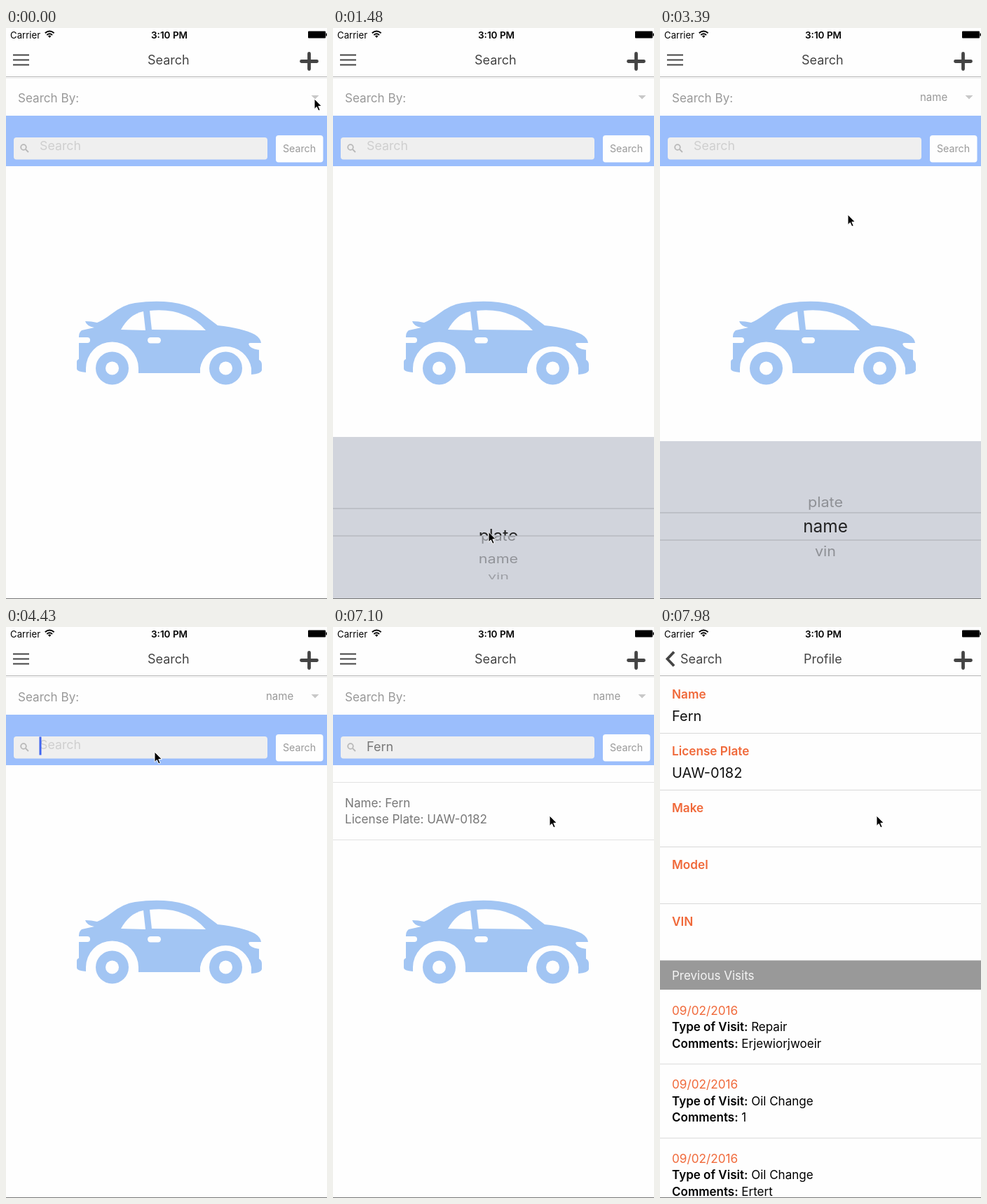
An HTML page that plays this animation: 458x814 px, repeating every 8000 ms.

```html
<!DOCTYPE html>
<html lang="en">
<head>
<meta charset="utf-8">
<title>Vehicle search</title>
<style>
  html, body { margin: 0; width: 100%; height: 100%; overflow: hidden; background: #fefefe; }
  svg { display: block; width: 458px; height: 814px; font-family: Inter, Roboto, sans-serif; }
  text { white-space: pre; }
</style>
</head>
<body>
<svg id="stage" viewBox="0 0 458 814">
  <defs>
    <clipPath id="lens"><rect y="685" width="458" height="39"/></clipPath>
    <clipPath id="rim"><path d="M0 583H458V685H0ZM0 724H458V840H0Z"/></clipPath>
  </defs>

  <g id="searchView">
    <rect y="70" width="458" height="744" fill="#fefefe"/>
    <text x="17" y="106" font-size="17.1" fill="#999">Search By:</text>
    <text id="choice" x="371" y="104" font-size="15" fill="#999">name</text>
    <path d="M435.500 96H446.500L441 101.500Z" fill="#c8c8c8"/>
    <rect y="125" width="458" height="72" fill="#9bbefc"/>
    <rect x="11" y="156" width="362" height="31.500" rx="4" fill="#efefef"/>
    <g fill="none" stroke="#b8b8b8" stroke-width="1.800">
      <circle cx="25" cy="170" r="3.800"/><path d="M28 173L32 177"/>
    </g>
    <text id="hint" x="48" y="174" font-size="17.8" fill="#cfcfcf">Search</text>
    <text id="typed" x="48" y="176.500" font-size="18" fill="#777"></text>
    <rect id="caret" y="156.500" width="3" height="26" fill="#4166f0"/>
    <rect id="button" x="385" y="153" width="67.500" height="38.500" rx="4"/>
    <text x="395" y="177" font-size="14.2" fill="#999">Search</text>

    <g id="car" fill="#a2c5f3">
      <path d="M113 418Q122 418 130 420Q138 417 150 408Q168 394 184 392Q212 388 236 391Q260 394 277 405L302 424Q338 428 355 437Q363 442 364 449L361 459V473Q365 475 365 480V488Q364 493 350 494V485A37 37 0 0 0 277 485V492H189V485A37.500 37.500 0 0 0 114 485V491Q101 490 101 486V476Q101 473 104 472V440Q104 434 108 431L126 427Q115 425 113 418Z"/>
      <g fill="#fefefe">
        <path d="M164 430Q176 408 196 404L199 431Z"/>
        <path d="M205 403Q256 398 285 431L208 430Z"/>
        <rect x="202" y="441" width="19" height="8.500" rx="4.200"/>
        <path d="M103 441H116A4 4 0 0 1 116 449H103Z"/>
        <path d="M366 449H349Q344 449 348 454Q353 459 366 459Z"/>
      </g>
      <circle cx="151.500" cy="485" r="23.500"/><circle cx="313.500" cy="485" r="23.500"/>
      <circle cx="151.500" cy="485" r="9.500" fill="#fefefe"/><circle cx="313.500" cy="485" r="9.500" fill="#fefefe"/>
    </g>

    <g id="result" font-size="17.1" fill="#777">
      <rect id="row" x="-1" y="221.500" width="460" height="82" stroke="#e2e2e2"/>
      <text id="resultName" x="17" y="256.500"></text>
      <text id="resultPlate" x="17" y="280"></text>
    </g>
  </g>

  <g id="picker">
    <rect y="583" width="458" height="240" fill="#d1d4dc"/>
    <g id="rimItems" clip-path="url(#rim)" fill="#8b8d92" font-size="21.600" text-anchor="middle"></g>
    <g id="lensItems" clip-path="url(#lens)" fill="#222" font-size="24.400" text-anchor="middle"></g>
    <path d="M0 685H458M0 724H458" stroke="#a9acb2"/>
  </g>

  <g id="profileView"><rect y="70" width="458" height="744" fill="#fefefe"/></g>

  <rect width="458" height="70" fill="#fefefe"/>
  <path d="M0 69.500H458" stroke="#b6b6b6"/>
  <path id="under" d="M0 71.500H458" stroke="#ececec"/>
  <text x="6" y="14.500" font-size="13.200">Carrier</text>
  <g fill="none" stroke="#000" stroke-width="1.900">
    <path d="M55.800 7.300Q62.200 1.800 68.600 7.300M58.300 9.900Q62.200 6.700 66.100 9.900"/>
  </g>
  <path d="M60 11.500Q62.200 9.700 64.400 11.500L62.200 14Z"/>
  <text x="207" y="14.500" font-size="13.500" font-weight="600">3:10 PM</text>
  <rect x="431" y="4.500" width="25" height="10" rx="1"/><rect x="456.500" y="7.500" width="1.500" height="4"/>
  <path id="menu" d="M10 38.500H33M10 45.500H33M10 52.500H33" stroke="#444" stroke-width="2"/>
  <path id="back" d="M20 35.500L10.500 45.500L20 55.500" fill="none" stroke="#444" stroke-width="3.800"/>
  <path d="M432.500 36.500V58.500M421.500 47.500H443.500" stroke="#444" stroke-width="4.800" stroke-linecap="round"/>
  <g font-size="18" fill="#444">
    <text id="title" y="52">Search</text>
    <text id="backLabel" y="52">Search</text>
    <text id="nextTitle" y="52">Profile</text>
  </g>
  <path d="M0 813.500H458" stroke="#777"/>
  <path id="pointer" d="M0 0V14.500L3.300 11.500L5.800 17L8.200 16L5.800 10.500H10.300Z" fill="#000" stroke="#fff" stroke-width="1"/>
</svg>
<script>
const LOOP = 8000;
const NAME = 'Fern', PLATE = 'UAW-0182';
const ORANGE = '#f0693a';
const $ = id => document.getElementById(id);

function add(parent, tag, attrs, content = '') {
  const node = document.createElementNS('http://www.w3.org/2000/svg', tag);
  for (const key in attrs) node.setAttribute(key, attrs[key]);
  node.textContent = content;
  parent.appendChild(node);
  return node;
}
const set = (id, key, value) => $(id).setAttribute(key, value);
const show = (id, on) => set(id, 'visibility', on ? 'visible' : 'hidden');
const place = (id, x, y) => set(id, 'transform', `translate(${x} ${y})`);
const mix = (a, b, k) => a + (b - a) * k;

// The picture only changes at these moments: [first, last, count].
const ticks = [
  [0, 0, 1], [300, 300, 1], [600, 1620, 8], [1770, 2810, 8], [2950, 3830, 7],
  [4430, 4430, 1], [4720, 5320, 5], [5610, 6050, 4], [6350, 6350, 1],
  [6650, 6650, 1], [6950, 7100, 2], [7390, 7980, 5]
].flatMap(([first, last, n]) =>
  Array.from({ length: n }, (_, i) => n > 1 ? Math.floor((first + (last - first) * i / (n - 1)) / 10) * 10 : first));

function track(keys, t) {
  const next = keys.findIndex(key => key[0] > t);
  if (next < 0) return keys[keys.length - 1].slice(1);
  const a = keys[next - 1], b = keys[next];
  return a.slice(1).map((v, i) => mix(v, b[i + 1], (t - a[0]) / (b[0] - a[0])));
}

const pointerPath = [
  [0, 440, 101], [300, 440, 101], [600, 437, 111], [1170, 222, 735], [1620, 222, 710],
  [2370, 222.5, 685], [2810, 222, 664], [3240, 268, 266], [3390, 268, 266],
  [3830, 212, 178], [5460, 212, 178], [6050, 389, 179], [6800, 389, 179], [7100, 309, 269]
];
const pickerDrop = [
  [0, 240], [300, 218], [600, 4.5], [740, 0], [3240, 0], [3390, 6], [3530, 150], [3680, 240]
];
const wheelTurn = [[0, 0], [1170, 0], [1620, 0.7], [2370, 1.39], [2660, 1.95], [2810, 2]];

// Picker wheel: rows sit on a cylinder, the first one is empty.
const RADIUS = 94, STEP = 21.8 * Math.PI / 180, AXIS = 704.5;
const wheelRows = ['plate', 'name', 'vin'].map(label => [
  add($('rimItems'), 'text', { y: 8 }, label),
  add($('lensItems'), 'text', { y: 8.5 }, label)
]);

function turnWheel(turn) {
  wheelRows.forEach((copies, i) => {
    const angle = (i + 1 - turn) * STEP;
    const y = AXIS + RADIUS * Math.sin(angle);
    for (const copy of copies) {
      copy.setAttribute('transform', `translate(236 ${y}) scale(1 ${Math.cos(angle)})`);
    }
    copies[0].setAttribute('opacity', 0.4 + 0.6 * Math.cos(angle));
  });
}

function buildProfile() {
  const view = $('profileView');
  const rule = y => add(view, 'path', { d: `M0 ${y}H458`, stroke: '#d9d9d9' });
  const write = (x, y, size, fill, content, weight = 400) =>
    add(view, 'text', { x, y, 'font-size': size, fill, 'font-weight': weight }, content);

  [['Name', NAME], ['License Plate', PLATE], ['Make', ''], ['Model', ''], ['VIN', '']].forEach(([label, value], i) => {
    const y = 81 * i;
    write(17, y + 101.5, 17.2, ORANGE, label, 600);
    write(17, y + 134, 20, '#111', value);
    rule(y + 151.5);
  });
  add(view, 'rect', { y: 475.5, width: 458, height: 41.5, fill: '#999' });
  write(17, 503, 17, '#f4f4f4', 'Previous Visits');

  [['Repair', 'Erjewiorjwoeir'], ['Oil Change', '1'], ['Oil Change', 'Ertert']].forEach(([type, comment], i) => {
    const y = 105.7 * i;
    write(17, y + 552.5, 17.2, ORANGE, '09/02/2016');
    [['Type of Visit:', type, 576], ['Comments:', comment, 599.7]].forEach(([label, value, base]) => {
      const line = write(17, y + base, 17, '#000', '');
      add(line, 'tspan', { 'font-weight': 600 }, label);
      add(line, 'tspan', {}, ' ' + value);
    });
    rule(y + 623);
  });
}

function drawSearch(t) {
  const letters = t < 4870 ? 0 : Math.min(4, 1 + Math.floor((t - 4870) / 150));
  const pressed = t >= 6050 && t < 6350;
  $('typed').textContent = NAME.slice(0, letters);
  show('hint', letters === 0);
  show('caret', t >= 4430 && t < 6050 && t !== 4720);
  set('caret', 'x', 47.5 + (letters ? $('typed').getComputedTextLength() + 0.5 : 0));
  set('button', 'fill', pressed ? '#e8e8e8' : '#fefefe');
  show('choice', t >= 2950);
  show('result', t >= 6650);
  set('row', 'fill', t >= 7390 ? '#dcdcdc' : '#fefefe');
}

function drawPush(t) {
  const k = Math.min(1, Math.max(0, (t - 7480) / 500));
  const p = 1 - (1 - k) ** 3.5;
  place('searchView', -151 * p, 0);
  place('profileView', 458 * (1 - p), 0);
  show('profileView', p > 0);
  show('under', p < 1);
  set('title', 'x', mix(202, 29, p));
  set('backLabel', 'x', mix(202, 29, p));
  set('nextTitle', 'x', mix(400, 205, p));
  for (const id of ['title', 'menu']) set(id, 'opacity', 1 - p);
  for (const id of ['backLabel', 'nextTitle', 'back']) set(id, 'opacity', p);
}

function draw(time) {
  const t = ticks.filter(tick => tick <= time).pop();
  drawSearch(t);
  drawPush(t);
  place('picker', 0, track(pickerDrop, t)[0]);
  turnWheel(track(wheelTurn, t)[0]);
  place('pointer', ...track(pointerPath, t));
}

buildProfile();
$('resultName').textContent = 'Name: ' + NAME;
$('resultPlate').textContent = 'License Plate: ' + PLATE;

const start = performance.now();
function frame() {
  draw((performance.now() - start) % LOOP);
  requestAnimationFrame(frame);
}
frame();
</script>
</body>
</html>
```
